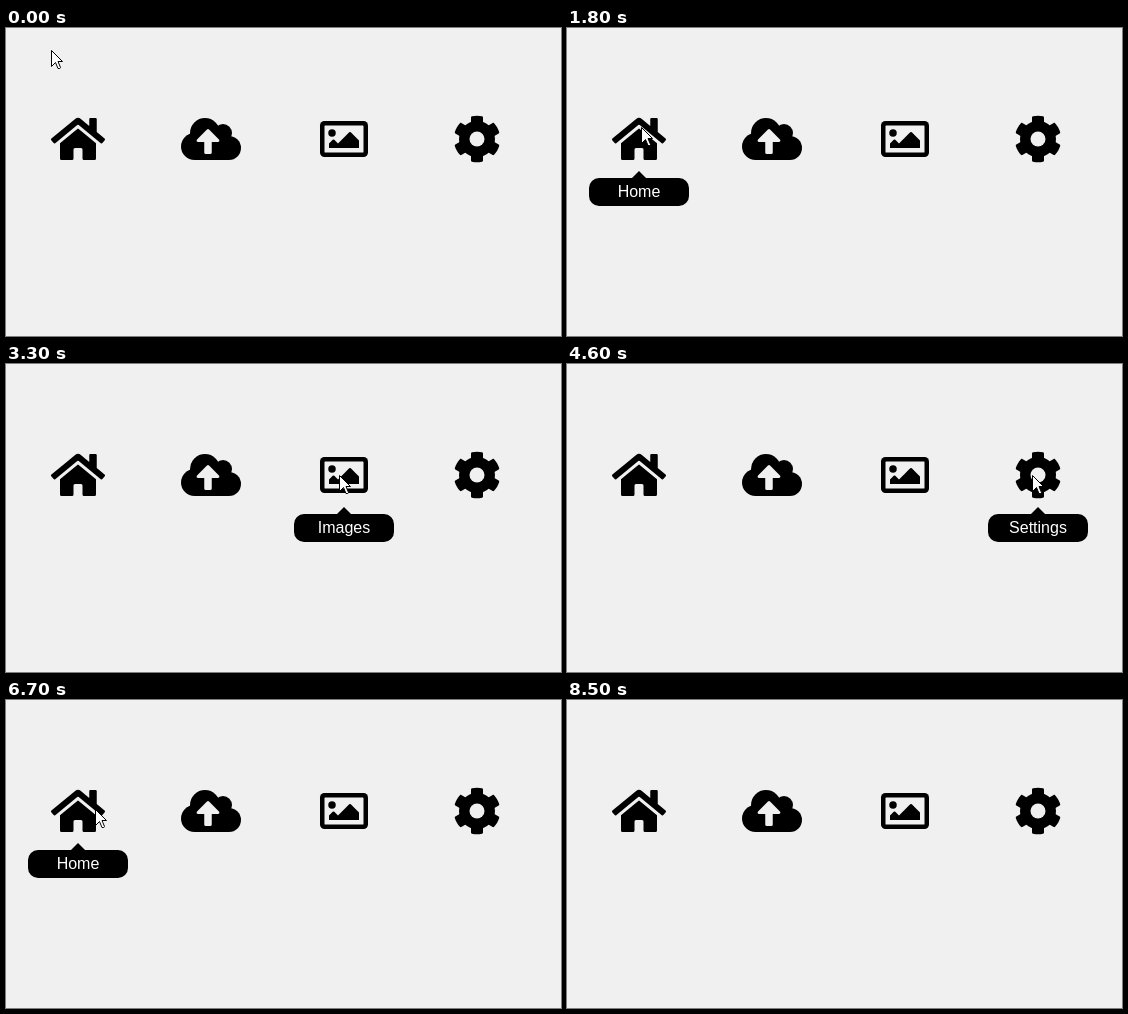
Recreate the animation shown at these times as an HTML page. Size 555x308 px, loop 8.8 s.

```html
<!DOCTYPE html>
<html lang="en">
<head>
<meta charset="utf-8">
<title>Icon tooltips</title>
<style>
  html, body { margin: 0; width: 100%; height: 100%; overflow: hidden; background: #f0f0f0; }
  svg { display: block; }
  text { font: 16px "Liberation Sans", Arial, sans-serif; fill: #fff; text-anchor: middle; }
  .gap { fill: #f0f0f0; }
  .tip { visibility: hidden; }
</style>
</head>
<body>
<svg width="555" height="308" viewBox="0 0 555 308">
  <defs>
    <path id="tooth" d="M-64-150v-80.2c0-5.6 3.9-10.5 9.4-11.7 34.9-7.8 72.5-8.2 109.2 0 5.5 1.2 9.4 6.1 9.4 11.7v80.2z"/>
  </defs>

  <g transform="translate(45 87) scale(.09375)">
    <path d="M280.4 148.3L96 300V464a16 16 0 0 0 16 16h112a16 16 0 0 0 16-16V368a16 16 0 0 1 16-16h64a16 16 0 0 1 16 16v96a16 16 0 0 0 16 16H464a16 16 0 0 0 16-16V300L295.7 148.3a12.2 12.2 0 0 0-15.3 0z"/>
    <path d="M571.6 251.5L488 182.6V44a12 12 0 0 0-12-12h-56a12 12 0 0 0-12 12v72.7L318.5 43a48 48 0 0 0-61 0L4.3 251.5a12 12 0 0 0-1.6 16.9l25.5 31A12 12 0 0 0 45.2 301L280.4 107.3a12.2 12.2 0 0 1 15.3 0L530.9 301a12 12 0 0 0 16.9-1.6l25.5-31a12 12 0 0 0-1.7-16.9z"/>
  </g>

  <g transform="translate(175 87) scale(.09375)">
    <circle cx="256" cy="192" r="160"/>
    <circle cx="448" cy="192" r="96"/>
    <circle cx="144" cy="336" r="144"/>
    <circle cx="512" cy="352" r="128"/>
    <path d="M144 250H512V480H144z"/>
    <path class="gap" d="M393.4 288H328v112a16 16 0 0 1-16 16h-48a16 16 0 0 1-16-16V288h-65.4c-14.3 0-21.4-17.2-11.3-27.3l105.4-105.4a16 16 0 0 1 22.6 0l105.4 105.4c10.1 10.1 2.9 27.3-11.3 27.3z"/>
  </g>

  <g transform="translate(314 87) scale(.09375)">
    <rect y="64" width="512" height="384" rx="48"/>
    <rect class="gap" x="48" y="112" width="416" height="288" rx="6"/>
    <circle cx="128" cy="192" r="40"/>
    <path d="M96 352h320v-80l-87.5-87.5a12 12 0 0 0-17 0L192 304l-39.5-39.5a12 12 0 0 0-17 0L96 304z"/>
  </g>

  <g id="cog" transform="translate(471 111) scale(.09375)">
    <circle r="192"/>
    <circle class="gap" r="80"/>
  </g>

  <g id="tips"></g>
  <path id="cursor" fill="#fff" stroke="#000" d="M.5.5V16.5L4.5 12.5L7 18.5H8.8L9.5 17.5L7 11.5H11.5z"/>
</svg>
<script>
const $ = id => document.getElementById(id);
const LOOP = 8800, STEP = 100;
const centers = [72, 205, 338, 471];

// time, x, y of the pointer tip
const track = [
  [0, 45, 22], [100, 44, 21], [400, 44, 21],
  [1300, 70, 97], [1400, 72, 99], [1700, 72, 99], [1800, 74, 99],
  [2400, 204, 111], [2500, 204, 111], [2600, 203, 111], [2800, 203, 111],
  [3300, 333, 111], [3600, 333, 111],
  [4000, 468, 111], [4500, 468, 111], [4600, 465, 111],
  [5300, 338, 98], [5500, 338, 98],
  [5800, 260, 102], [6100, 154, 108], [6400, 200, 110],
  [6700, 89, 109], [7400, 89, 109],
  [8300, 65, -14], [8400, 64, -15], [8500, 64, -40], [LOOP, 64, -40]
];

for (let a = 0; a < 360; a += 60)
  $('cog').insertAdjacentHTML('afterbegin', `<use href="#tooth" transform="rotate(${a})"/>`);

$('tips').innerHTML = ['Home', 'Upload', 'Images', 'Settings'].map((label, i) =>
  `<g class="tip" transform="translate(${centers[i]} 150)">
    <rect x="-50" width="100" height="28" rx="10"/>
    <path d="M-8 1L0-7L8 1z"/>
    <text y="19">${label}</text>
  </g>`).join('');
const tips = [...$('tips').children];

function pointerAt(t) {
  const i = track.findIndex(k => k[0] > t);
  const [t0, x0, y0] = track[i - 1], [t1, x1, y1] = track[i];
  const p = (t - t0) / (t1 - t0), e = p * p * (3 - 2 * p);
  return [Math.round(x0 + (x1 - x0) * e), Math.round(y0 + (y1 - y0) * e)];
}

function draw() {
  const t = performance.now() % LOOP;
  const [x, y] = pointerAt(Math.floor(t / STEP) * STEP);
  $('cursor').setAttribute('transform', `translate(${x} ${y})`);
  tips.forEach((tip, i) => {
    const over = Math.abs(x - centers[i]) < 30 && y >= 87 && y < 135;
    tip.style.visibility = over ? 'visible' : 'hidden';
  });
  requestAnimationFrame(draw);
}
draw();
</script>
</body>
</html>
```
